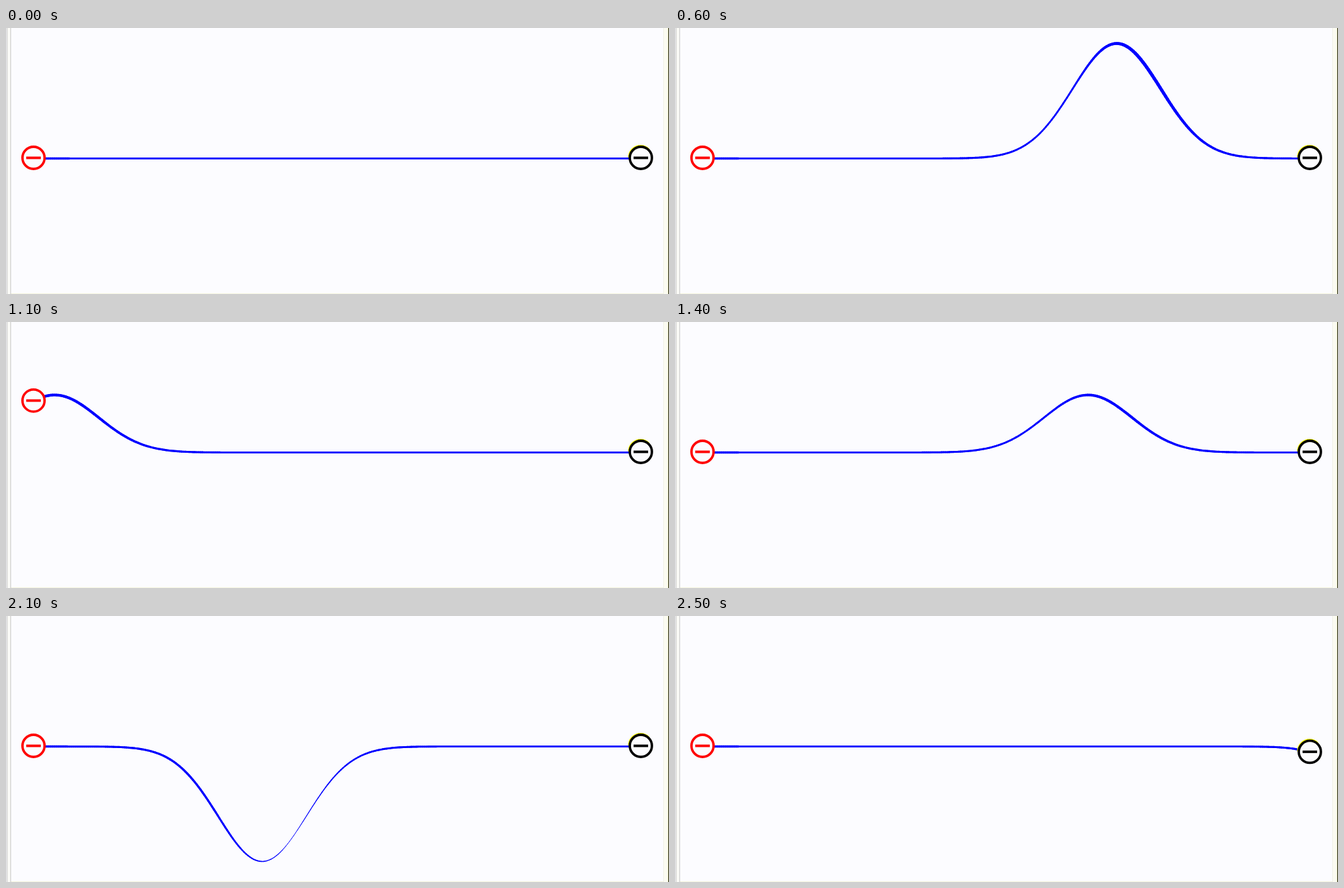
Recreate the animation shown at these times as an HTML page with a canvas. Size 1048 by 421 pixels, loop 2600 ms.

```html
<!DOCTYPE html>
<html lang="en">
<head>
<meta charset="utf-8">
<title>Pulses between two charges</title>
<style>
  html, body { margin: 0; width: 100%; height: 100%; overflow: hidden; background: #fcfcff; }
  canvas { display: block; }
</style>
</head>
<body>
<canvas id="stage" width="1048" height="421"></canvas>
<script>
const ctx = document.getElementById('stage').getContext('2d');
const STEP_MS = 100, STEPS = 26;
const LEFT = 43.5, RIGHT = 1003.5, BASE = 206.5;
const SPEED = 192;      // pixels per step
const PULSE_WIDTH = 98.5;
const HEIGHT = 182;

// Step at which each pulse leaves the left charge, and its relative strength.
const pulses = [
  { start: 2.59, strength: 1 },
  { start: 10.826, strength: 0.5 },
  { start: 19.117, strength: -1 }
];

function lift(x, step) {
  return pulses.reduce((sum, { start, strength }) => {
    const d = (x - LEFT - SPEED * (step - start)) / PULSE_WIDTH;
    return sum + strength * Math.exp(-d * d);
  }, 0);
}

function rect(color, x, y, w, h) {
  ctx.fillStyle = color;
  ctx.fillRect(x, y, w, h);
}

function drawBackground() {
  rect('#fcfcff', 0, 0, 1048, 421);
  rect('#f8f8f4', 2, 0, 5, 421);
  rect('#bcbcbc', 1, 0, 1, 421);
  rect('#c8c8c8', 7, 0, 1, 421);
  rect('#f0f0e6', 1039, 0, 1, 421);
  rect('#fcfcf2', 1040, 0, 6, 421);
  rect('#e6e6a8', 1046, 0, 1, 421);
  rect('#222222', 1047, 0, 1, 421);
  rect('#f4f4dc', 8, 420, 1031, 1);
}

// The line swells on crests and falling slopes and thins in troughs.
function drawString(step) {
  const dx = 3;
  ctx.strokeStyle = '#0000ff';
  ctx.lineCap = 'round';
  for (let x = LEFT; x < RIGHT; x += dx) {
    const a = lift(x, step), b = lift(x + dx, step);
    const fall = (a - b) * HEIGHT / dx;
    ctx.lineWidth = 3.1 + 1.5 * a + 0.65 * fall + Math.exp((LEFT - x) / 30);
    ctx.beginPath();
    ctx.moveTo(x, BASE - HEIGHT * a);
    ctx.lineTo(x + dx, BASE - HEIGHT * b);
    ctx.stroke();
  }
  ctx.lineCap = 'butt';
}

function ring(x, y, radius, color, width, from = 0, to = 2 * Math.PI) {
  ctx.beginPath();
  ctx.arc(x, y, radius, from, to);
  ctx.strokeStyle = color;
  ctx.lineWidth = width;
  ctx.stroke();
}

function drawCharge(x, step, color, fringe) {
  const y = BASE - 1 - HEIGHT * lift(x, step);
  ctx.beginPath();
  ctx.arc(x, y, 18, 0, 2 * Math.PI);
  ctx.fillStyle = '#fcfcff';
  ctx.fill();
  if (fringe) ring(x - 0.5, y - 0.8, 18.5, '#ffff00', 2.5, Math.PI, 1.75 * Math.PI);
  ring(x, y, 17.5, color, 3.8);
  rect(color, x - 11.5, y - 2, 23, 4);
}

function frame(now) {
  const step = Math.floor(now / STEP_MS) % STEPS;
  drawBackground();
  drawString(step);
  drawCharge(LEFT, step, '#ff0000', false);
  drawCharge(RIGHT, step, '#000000', true);
  requestAnimationFrame(frame);
}
frame(performance.now());
</script>
</body>
</html>
```
